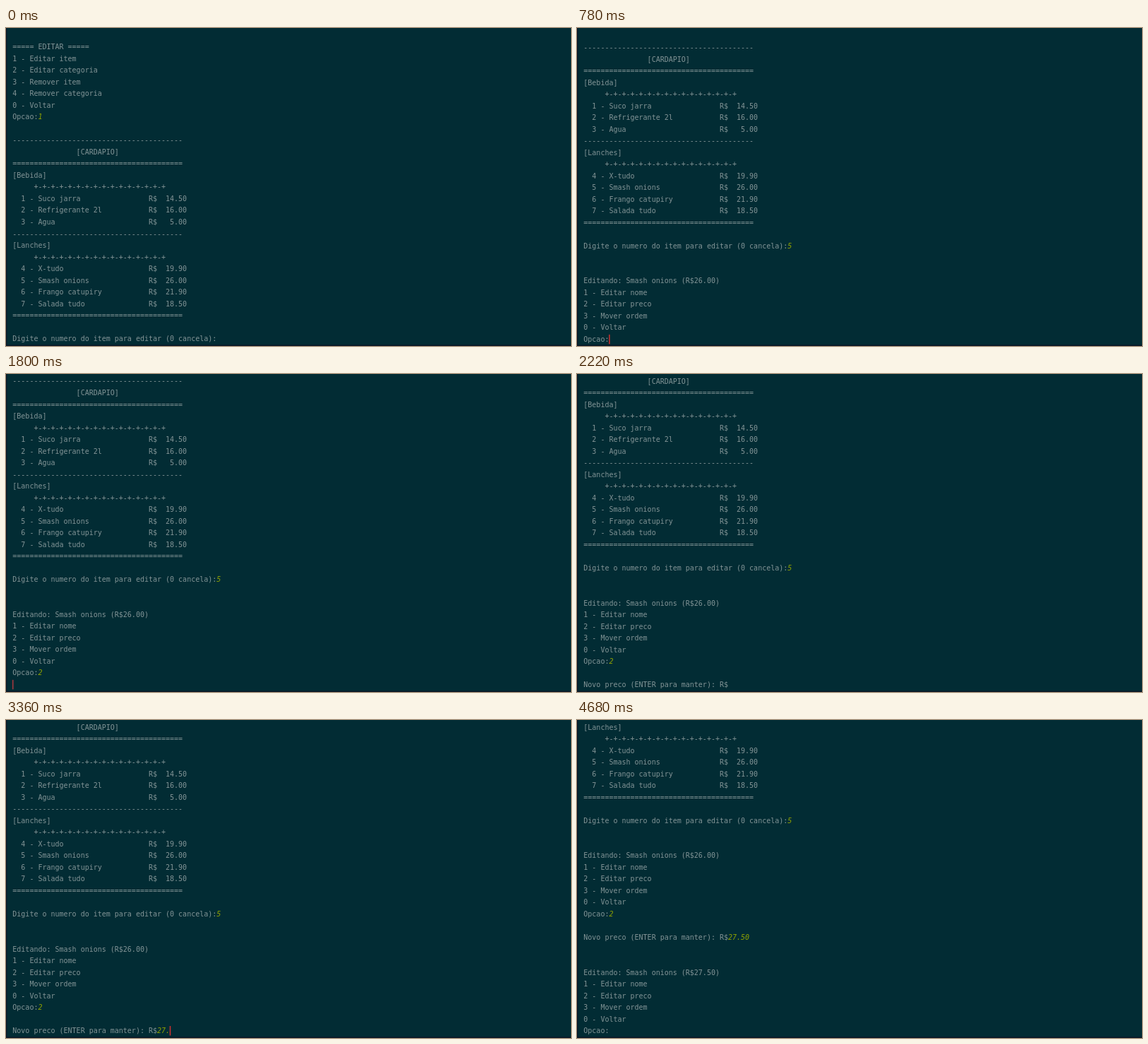
An HTML page with a canvas for the animation above (4740 ms loop, 800 by 450 pixels).

```html
<!DOCTYPE html>
<html lang="pt">
<head>
<meta charset="utf-8">
<title>Terminal</title>
<style>
html, body { margin: 0; width: 100%; height: 100%; overflow: hidden; background: #022c34; }
canvas { display: block; }
</style>
</head>
<body>
<canvas id="stage" width="800" height="450"></canvas>
<script>
const ctx = document.getElementById("stage").getContext("2d");
const LOOP = 4740, BLINK = 480;
const LEFT = 9.3, COLUMN = 6.02, ROW = 16.52, BASELINE = 443.2;
const FONT = '10px "DejaVu Sans Mono", monospace';

const dashes = "-".repeat(40), equals = "=".repeat(40);
const divider = "     " + "+-".repeat(15) + "+";
const dish = (number, name, price) =>
  `  ${number} - ${name}`.padEnd(32) + "R$" + price.padStart(7);
const editMenu = price => [
  `Editando: Smash onions (R$${price})`,
  "1 - Editar nome", "2 - Editar preco", "3 - Mover ordem", "0 - Voltar", "Opcao:"
];

const lines = [
  "===== EDITAR =====",
  "1 - Editar item", "2 - Editar categoria", "3 - Remover item",
  "4 - Remover categoria", "0 - Voltar", "Opcao:", "",
  dashes, " ".repeat(15) + "[CARDAPIO]", equals,
  "[Bebida]", divider,
  dish(1, "Suco jarra", "14.50"),
  dish(2, "Refrigerante 2l", "16.00"),
  dish(3, "Agua", "5.00"),
  dashes,
  "[Lanches]", divider,
  dish(4, "X-tudo", "19.90"),
  dish(5, "Smash onions", "26.00"),
  dish(6, "Frango catupiry", "21.90"),
  dish(7, "Salada tudo", "18.50"),
  equals, "",
  "Digite o numero do item para editar (0 cancela):", "", "",
  ...editMenu("26.00"), "",
  "Novo preco (ENTER para manter): R$", "", "",
  ...editMenu("27.50")
];

// time, last visible line, vertical offset of the scroll position
const scrolls = [
  [0, 25, 0], [660, 26, 0], [780, 33, 0.8], [1740, 34, -0.2],
  [1860, 35, 0], [3960, 36, 0], [4080, 43, 0]
];
// time, line, typed character
const keys = [
  [-1, 6, "1"], [360, 25, "5"], [1620, 33, "2"], [2760, 35, "2"],
  [3000, 35, "7"], [3360, 35, "."], [3540, 35, "5"], [3720, 35, "0"]
];
// the caret restarts its blinking on every key press
const caretResets = [60, 660, 1740, 3960, ...keys.map(key => key[0])].filter(time => time > 0);

const typedAt = (line, t) =>
  keys.filter(key => key[1] === line && key[0] <= t).map(key => key[2]).join("");

function write(text, column, y, color, style = "") {
  ctx.font = style + FONT;
  ctx.fillStyle = color;
  ctx.fillText(text, LEFT + column * COLUMN, y);
}

function draw(t) {
  ctx.fillStyle = "#022c34";
  ctx.fillRect(0, 0, 800, 450);

  const [, last, offset] = scrolls.filter(scroll => scroll[0] <= t).pop();
  for (let i = Math.max(0, last - 26); i <= last; i++) {
    const y = BASELINE + offset - (last - i) * ROW;
    write(lines[i], 0, y, "#839496");
    write(typedAt(i, t), lines[i].length, y, "#8fa300", "italic ");
  }

  const reset = Math.max(...caretResets.filter(time => time <= t));
  if (t >= 60 && Math.floor((t - reset) / BLINK) % 2 === 0) {
    const column = lines[last].length + typedAt(last, t).length;
    ctx.fillStyle = lines[last] ? "#d0302f" : "#a8383e";
    ctx.fillRect(LEFT + column * COLUMN - 0.3, 433 + offset, 1.5, 13.5);
  }

  ctx.fillStyle = "#0c1826";
  ctx.fillRect(0, 0, 1.4, 450);
  ctx.fillRect(0, 448.4, 800, 1.6);
}

const start = performance.now();
function tick() {
  draw((performance.now() - start) % LOOP);
  requestAnimationFrame(tick);
}
tick();
</script>
</body>
</html>
```
